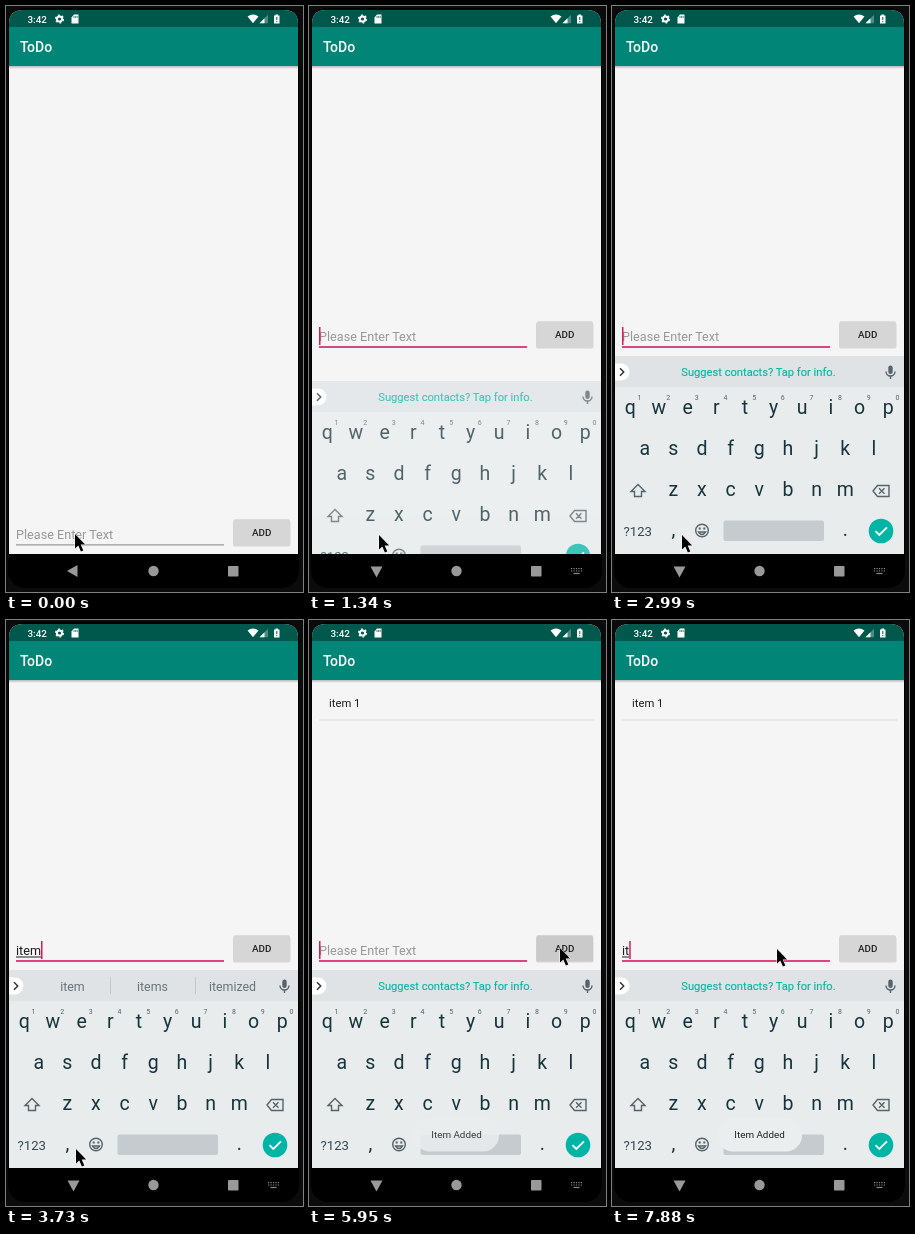
Write an HTML page that moves like this. It is 297 px wide and 586 px high and loops after 8 s.

```html
<!DOCTYPE html>
<html lang="en">
<head>
<meta charset="utf-8">
<title>ToDo app demo</title>
<style>
  html, body { margin: 0; width: 100%; height: 100%; overflow: hidden; background: #000; }
  svg { display: block; width: 297px; height: 586px; font-family: Roboto, "Noto Sans", sans-serif; }
  text { white-space: pre; }
  .mid { text-anchor: middle; }
  .medium { font-weight: 500; }
  .field { font-size: 12.65px; }
  .key { font-size: 19.5px; fill: #17343d; text-anchor: middle; }
  .digit { font-size: 7px; fill: #52646b; text-anchor: middle; }
  .word { font-size: 12.4px; fill: #68747a; text-anchor: middle; }
  .line { fill: none; stroke: #56636a; stroke-width: 1.4; }
</style>
</head>
<body>
<svg viewBox="0 0 297 586">
  <defs>
    <clipPath id="screen"><path d="M3 548V18Q3 4 17 4H278Q292 4 292 18V548Z"/></clipPath>
    <linearGradient id="shade" x2="0" y2="1">
      <stop stop-color="#000" stop-opacity=".25"/><stop offset="1" stop-color="#000" stop-opacity="0"/>
    </linearGradient>
  </defs>
  <rect width="297" height="586" fill="#0b0b0c"/>
  <rect x="2" y="2" width="291" height="580" rx="17"/>

  <g clip-path="url(#screen)">
    <rect x="3" y="4" width="289" height="544" fill="#f5f5f5"/>
    <rect x="3" y="4" width="289" height="17" fill="#00574b"/>
    <rect x="3" y="21" width="289" height="39" fill="#008577"/>
    <rect x="3" y="60" width="289" height="3" fill="url(#shade)"/>
    <text class="medium" x="14" y="46" font-size="14" fill="#fff">ToDo</text>

    <g fill="#fff">
      <text class="medium" x="21.5" y="16.5" font-size="9.9">3:42</text>
      <circle cx="53.5" cy="13" r="2.6" fill="none" stroke="#fff" stroke-width="2"/>
      <circle cx="53.5" cy="13" r="3.9" fill="none" stroke="#fff" stroke-width="1.3" stroke-dasharray="2 2.08"/>
      <path d="M65.5 11.5L68 8.5H72.5V17.5H65.5Z"/>
      <path d="M68 10v2M69.6 10v2M71.2 10v2" stroke="#00574b" stroke-width=".7"/>
      <path d="M241.5 10.5Q247 6.500 252.500 10.500L247 17.200Z"/>
      <path d="M253.500 17.200L262 8.700V17.200Z" opacity=".3"/>
      <path d="M253.500 17.200L258.500 12.200V17.200Z"/>
      <path d="M268 9.500H269.500V8.500H272V9.500H273.500V17.500H268Z"/>
      <path d="M270.800 11v3M270.800 15v1.200" stroke="#00574b" stroke-width="1"/>
    </g>

    <g id="item">
      <text x="20" y="87" font-size="11.25" fill="#1d1d1d">item 1</text>
      <rect x="10" y="99.500" width="275" height="1" fill="#dadada"/>
    </g>

    <g id="form">
      <text id="hint" class="field" x="10" y="335" fill="#999">Please Enter Text</text>
      <text id="typed" class="field" x="10" y="335" fill="#1d1d1d"></text>
      <rect id="compose" x="10" y="336.500" height="1" fill="#222"/>
      <rect id="caret" y="321" width="1.500" height="18" fill="#d81b60"/>
      <rect id="rule" x="10" width="208"/>
      <rect x="227" y="316.500" width="57.500" height="26" rx="2" fill="#000" opacity=".13"/>
      <rect id="button" x="227.500" y="315.300" width="56.500" height="26" rx="1.500"/>
      <text class="mid medium" x="255.700" y="331.600" font-size="9.84" fill="#212121">ADD</text>
    </g>

    <g id="keyboard">
      <rect x="3" y="350" width="289" height="198" fill="#e8eced"/>
      <rect x="3" y="350" width="289" height="31" fill="#dfe3e6"/>
      <path d="M3 357.500H9A8.500 8.500 0 0 1 9 374.500H3Z" fill="#fff"/>
      <path d="M8 362.300L11.700 366L8 369.700" fill="none" stroke="#333" stroke-width="1.500"/>
      <text id="tip" class="mid" x="146.500" y="370" font-size="11.15" fill="#08b5a2" stroke="#08b5a2" stroke-width=".15">Suggest contacts? Tap for info.</text>
      <g id="words">
        <text class="word" x="66.500" y="370.500"></text>
        <text class="word" x="146.500" y="370.500"></text>
        <text class="word" x="226.500" y="370.500"></text>
        <path d="M104.500 357V374M189.500 357V374" stroke="#c3c8cb"/>
      </g>
      <rect x="276.300" y="359.500" width="4.400" height="8.500" rx="2.200" fill="#56636a"/>
      <path class="line" d="M274 365.500A4.500 4.500 0 0 0 283 365.500M278.500 370V373" stroke-width="1.200"/>
      <g id="keys"></g>
      <path class="line" d="M26 478.500L33 485.500H29.500V490.500H22.500V485.500H19Z"/>
      <path class="line" d="M265.500 479.500H277V490.500H265.500L261 485ZM267 482.300L272.500 487.800M272.500 482.300L267 487.800"/>
      <text x="11.500" y="529.500" font-size="13.2" fill="#33474f">?123</text>
      <circle class="line" cx="90" cy="524.500" r="6.300"/>
      <path class="line" d="M86.500 526Q90 531 93.500 526Z" stroke-width="1"/>
      <path d="M86.700 522.500h2M91.300 522.500h2" stroke="#56636a" stroke-width="1.800"/>
      <rect x="111.500" y="514.500" width="100.500" height="20.500" rx="2" fill="#c5cbcf"/>
      <circle cx="269" cy="525" r="12.300" fill="#00b5a5"/>
      <path d="M263.500 525.200L267.300 529L275 521.300" fill="none" stroke="#fff" stroke-width="1.800"/>
    </g>

    <g id="toast">
      <rect x="105" y="498" width="85" height="33.500" rx="16" fill="#ebeeef"/>
      <text class="mid" x="147.500" y="518" font-size="9.84" fill="#222">Item Added</text>
    </g>
  </g>

  <g fill="#999">
    <path id="back"/>
    <circle cx="147.500" cy="565" r="5.200"/>
    <rect x="222" y="560" width="10.500" height="10.500" rx=".8"/>
    <g id="imeIcon" fill="none" stroke="#8a8a8a" stroke-width="1.200">
      <path d="M262 562.600H273M262 565H273" stroke-dasharray="1.200 1.250"/>
      <path d="M264.500 567.500H270.500"/>
    </g>
  </g>

  <path id="pointer" d="M0 0V14.500L3.300 11.500L5.900 17.500L8.300 16.400L5.700 10.600H10.200Z" stroke="#fff" stroke-width="1" paint-order="stroke"/>
</svg>

<script>
const LOOP = 8000;
const $ = id => document.getElementById(id);
const attr = (id, values) => {
  for (const k in values) $(id).setAttribute(k, values[k]);
};
const show = (id, on) => attr(id, { visibility: on ? 'visible' : 'hidden' });

// Keyboard letters: string, first key centre, baseline
const PITCH = 28.65;
const addKey = (cls, x, y, label) => {
  const key = document.createElementNS('http://www.w3.org/2000/svg', 'text');
  key.setAttribute('class', cls);
  key.setAttribute('x', x);
  key.setAttribute('y', y);
  key.textContent = label;
  $('keys').append(key);
};
[['qwertyuiop', 18.3, 407.5], ['asdfghjkl', 32.7, 449], ['zxcvbnm', 61.3, 490.3]].forEach(([row, x, y]) =>
  [...row].forEach((c, i) => addKey('key', x + i * PITCH, y, c)));
[...'1234567890'].forEach((c, i) => addKey('digit', 27.5 + i * PITCH, 393.5, c));
addKey('key', 61.3, 530, ',');
addKey('key', 233.3, 530, '.');

// Each step changes part of the state and holds until the next
const steps = [
  [0, { at: [69, 528], text: '', caret: false, focus: false, raised: false, ime: false,
        kb: 0, bar: 'tip', compose: false, pressed: 0, item: false, toast: 0 }],
  [150, { at: [69.5, 528.5] }],
  [300, { at: [70, 529] }],
  [890, { focus: true, caret: true }],
  [1040, { ime: true }],
  [1190, { raised: true }],
  [1340, { kb: 0.75 }],
  [1490, { kb: 1, caret: false }],
  [2090, { caret: true }],
  [2540, { caret: false }],
  [2990, { caret: true }],
  [3130, { text: 'i', compose: true }],
  [3280, { text: 'it' }],
  [3580, { text: 'ite' }],
  [3730, { text: 'item', bar: ['item', 'items', 'itemized'] }],
  [4180, { caret: false }],
  [4330, { text: 'item ', caret: true, compose: false, bar: [',', '.', '!'] }],
  [4620, { text: 'item 1', bar: '' }],
  [4920, { at: [88, 503] }],
  [5070, { at: [140, 418], caret: false }],
  [5220, { at: [195, 336] }],
  [5360, { at: [236, 327] }],
  [5510, { at: [251, 328], caret: true }],
  [5650, { pressed: 1 }],
  [5800, { text: '', item: true, bar: 'tip', toast: 0.3 }],
  [5950, { toast: 0.85, pressed: 0.5 }],
  [6100, { toast: 1, pressed: 0.2, at: [240, 330] }],
  [6250, { pressed: 0, at: [203, 331] }],
  [6390, { at: [173, 330] }],
  [6540, { at: [165, 329], caret: false }],
  [6990, { caret: true }],
  [7430, { caret: false }],
  [7580, { text: 'i', caret: true, compose: true }],
  [7880, { text: 'it' }],
];

function draw(s) {
  attr('pointer', { transform: `translate(${s.at})` });
  attr('form', { transform: `translate(0 ${s.raised ? 0 : 198})` });

  $('typed').textContent = s.text;
  const width = s.text ? $('typed').getComputedTextLength() : 0;
  show('hint', !s.text);
  show('compose', s.compose);
  attr('compose', { width });
  show('caret', s.caret);
  attr('caret', { x: 10 + width });
  attr('rule', s.focus
    ? { y: 340.2, height: 1.6, fill: '#d81b60' }
    : { y: 340.4, height: 1, fill: '#858585' });
  const tone = 214 - 24 * s.pressed;
  attr('button', { fill: `rgb(${tone},${tone},${tone})` });

  attr('keyboard', { opacity: s.kb, transform: `translate(0 ${(1 - s.kb) * 100})` });
  const words = Array.isArray(s.bar);
  show('tip', s.bar === 'tip');
  show('words', words);
  if (words) s.bar.forEach((w, i) => { $('words').children[i].textContent = w; });

  show('item', s.item);
  attr('toast', { opacity: s.toast });
  show('imeIcon', s.ime);
  attr('back', { d: s.ime ? 'M61.500 560.500H73.500L67.500 571.500Z' : 'M61 565L71.500 559V571Z' });
}

let last = -1;
function tick() {
  const t = performance.now() % LOOP;
  const past = steps.filter(([time]) => time <= t);
  if (past.length !== last) {
    last = past.length;
    draw(Object.assign({}, ...past.map(([, change]) => change)));
  }
  requestAnimationFrame(tick);
}
tick();
</script>
</body>
</html>
```
